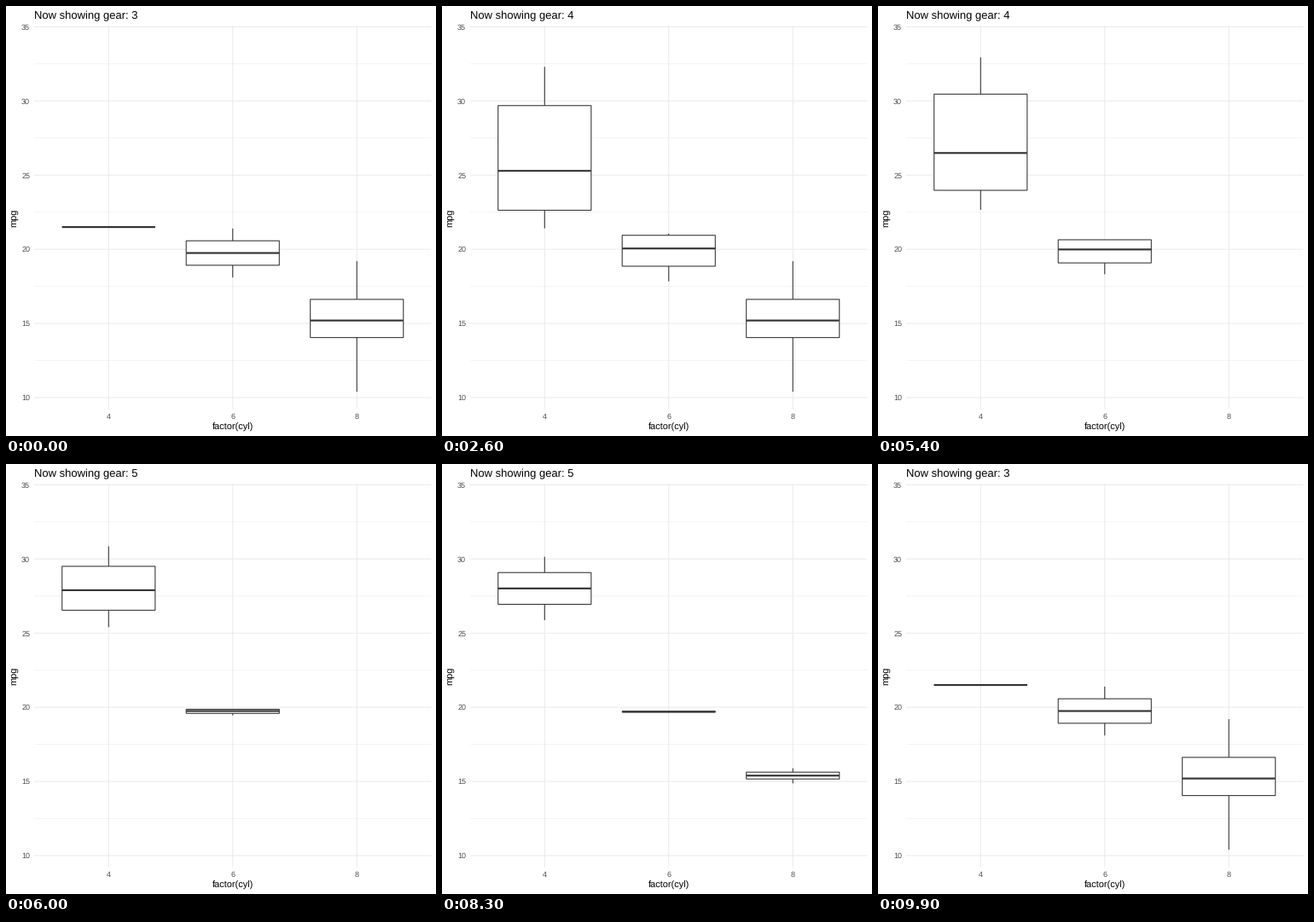
A matplotlib script for the animation above (10000 ms loop, 504 by 504 pixels).

```python
import matplotlib.pyplot as plt
import numpy as np
from matplotlib.animation import FuncAnimation
from matplotlib.patches import Polygon

plt.rcParams["font.family"] = "Liberation Sans"
plt.rcParams["text.hinting"] = "none"
plt.rcParams["text.hinting_factor"] = 1

SIZE, FRAMES = 504, 100
LEFT, RIGHT, TOP, BOTTOM = 33.0, 498.5, 23.1, 472.5
Y_MAX, UNIT = 35.075, 17.385
STEP = (RIGHT - LEFT) / 3.2
CENTRES = [LEFT + STEP * (0.6 + i) for i in range(3)]
HALF = STEP * 0.375
THIN = 1.07
INK, GRID, GREY = "#333333", "#ebebeb", "#4d4d4d"

# min, lower quartile, median, upper quartile, max for 4, 6 and 8 cylinders
STATS = {
    3: [[21.5] * 5, [18.1, 18.925, 19.75, 20.575, 21.4],
        [10.4, 14.05, 15.2, 16.625, 19.2]],
    4: [[21.4, 22.8, 25.85, 30.9, 33.9], [17.8, 18.85, 20.1, 21, 21], None],
    5: [[26, 27.1, 28.2, 29.3, 30.4], [19.7] * 5,
        [15, 15.2, 15.4, 15.6, 15.8]],
}
# first frame, last frame, gear before, gear after
MOVES = [(11, 33, 3, 4), (45, 67, 4, 5), (79, 100, 5, 3)]


def to_y(mpg):
    return TOP + (Y_MAX - np.asarray(mpg, float)) * UNIT


def ease(p):
    return 4 * p ** 3 if p < 0.5 else 1 - 4 * (1 - p) ** 3


fig = plt.figure(figsize=(SIZE / 72, SIZE / 72), dpi=72, facecolor="white")
ax = fig.add_axes([0, 0, 1, 1])
ax.set_xlim(0, SIZE)
ax.set_ylim(SIZE, 0)
ax.axis("off")


def line(xs, ys, color, width, z):
    return ax.plot(xs, ys, color=color, lw=width, zorder=z, snap=False,
                   solid_capstyle="butt")[0]


def label(x, y, text, size, color="black", ha="center", **kw):
    return ax.text(x, y, text, fontsize=size, color=color, ha=ha,
                   va="baseline", zorder=5, **kw)


for mpg in np.arange(12.5, 35, 5):
    line([LEFT, RIGHT], [to_y(mpg)] * 2, GRID, THIN / 2, 1)
for mpg in range(10, 36, 5):
    y = to_y(mpg)
    line([LEFT, RIGHT], [y, y], GRID, THIN, 1)
    label(28.1, y + 3.2, str(mpg), 8.8, GREY, "right")
for x, cyl in zip(CENTRES, (4, 6, 8)):
    line([x, x], [TOP, BOTTOM], GRID, THIN, 1)
    label(x, 484.2, str(cyl), 8.8, GREY)

label((LEFT + RIGHT) / 2, 497, "factor(cyl)", 11)
label(13.3, (TOP + BOTTOM) / 2, "mpg", 11, rotation=90,
      rotation_mode="anchor")
title = label(LEFT, 15, "", 13.2, ha="left")


class Box:
    def __init__(self, x):
        self.x = x
        self.whiskers = [line([x, x], [0, 0], INK, THIN, 2) for _ in range(2)]
        self.body = Polygon(np.zeros((4, 2)), closed=True, facecolor="white",
                            edgecolor=INK, lw=THIN, joinstyle="miter",
                            snap=False, zorder=3)
        ax.add_patch(self.body)
        self.median = line([x - HALF, x + HALF], [0, 0], INK, 2 * THIN, 4)
        self.parts = [*self.whiskers, self.body, self.median]

    def show(self, stats):
        for part in self.parts:
            part.set_visible(stats is not None)
        if stats is None:
            return
        low, q1, mid, q3, high = to_y(stats)
        self.whiskers[0].set_ydata([low, q1])
        self.whiskers[1].set_ydata([q3, high])
        a, b = self.x - HALF, self.x + HALF
        self.body.set_xy([(a, q3), (a, q1), (b, q1), (b, q3)])
        self.median.set_ydata([mid, mid])


boxes = [Box(x) for x in CENTRES]


def blend(a, b, t):
    # a box without a partner stays as it is until the move ends
    if a is None or b is None:
        return a
    return np.array(a) * (1 - t) + np.array(b) * t


def phase(frame):
    """Gear before, gear after and linear progress at a frame."""
    old, new, p = 3, 3, 0.0
    for start, end, a, b in MOVES:
        if frame >= end:
            old, new, p = b, b, 0.0
        elif frame >= start:
            old, new, p = a, b, (frame - start) / (end - start)
    return old, new, p


def draw(frame):
    old, new, p = phase(frame)
    title.set_text(f"Now showing gear: {new if p >= 0.5 else old}")
    for box, a, b in zip(boxes, STATS[old], STATS[new]):
        box.show(blend(a, b, ease(p)))
    return [title, *(part for box in boxes for part in box.parts)]


anim = FuncAnimation(fig, draw, frames=FRAMES, interval=100, repeat=True,
                     repeat_delay=0, init_func=lambda: draw(0), blit=False)
plt.show()
```
